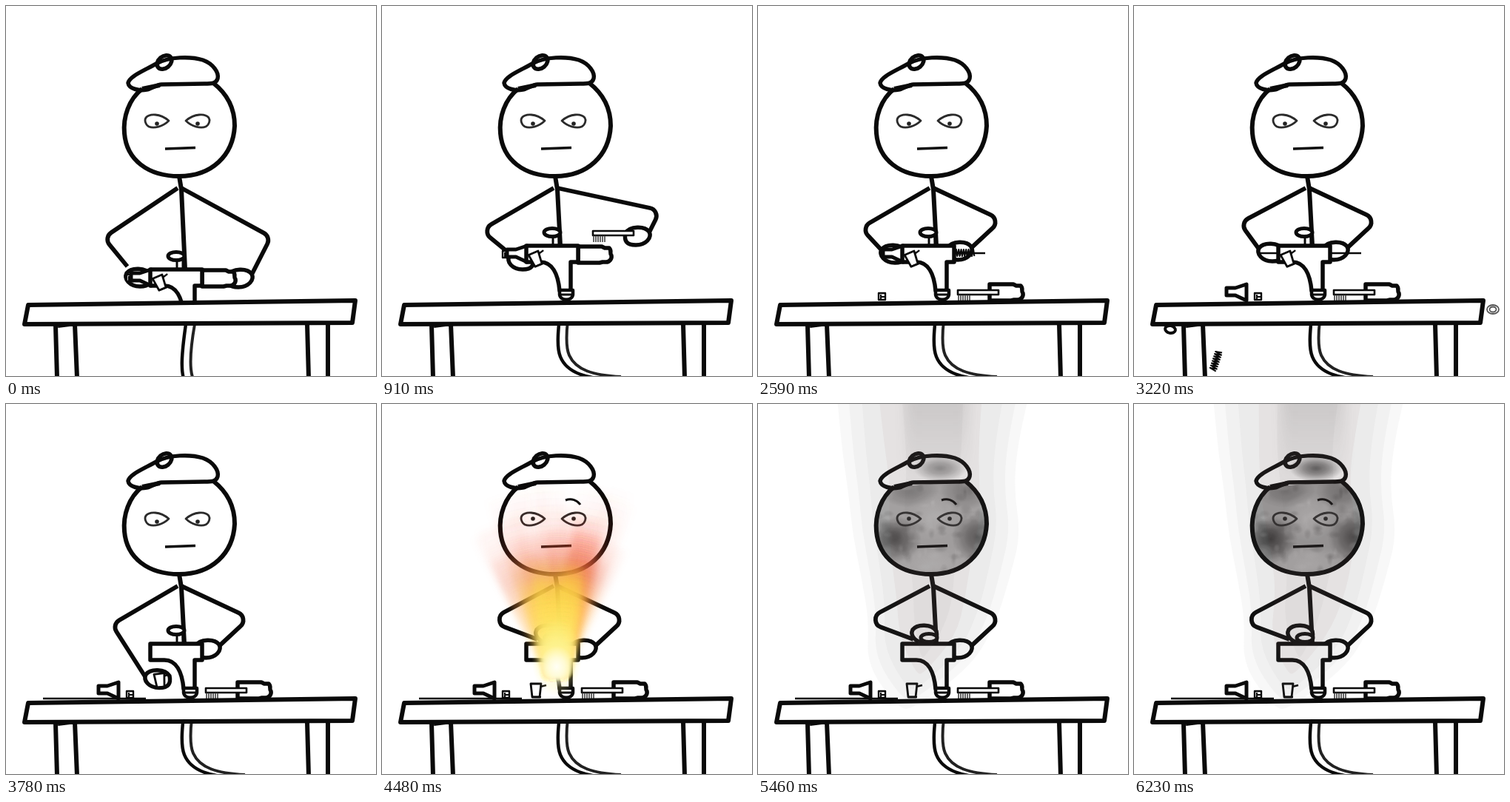
Write an HTML page with a canvas that moves like this. It is 500x500 px and loops after 6.3 s.

```html
<!DOCTYPE html>
<html>
<head>
<meta charset="utf-8">
<style>
html, body { margin: 0; width: 100%; height: 100%; overflow: hidden; background: #fff; }
canvas { display: block; }
</style>
</head>
<body>
<canvas id="stage" width="500" height="500"></canvas>
<script>
const c = document.getElementById('stage').getContext('2d');
const LOOP = 6300, STEP = 70, INK = '#0a0a0a', TAU = Math.PI * 2;
const clamp = v => Math.max(0, Math.min(1, v));
const mix = (a, b, k) => a + (b - a) * k;
const ramp = (t, from, to) => clamp((t - from) / (to - from));

// Rows are [time, ...values]; returns the values interpolated at t.
function at(rows, t) {
  const i = rows.findIndex(r => r[0] > t);
  if (i === 0) return rows[0].slice(1);
  if (i < 0) return rows[rows.length - 1].slice(1);
  const a = rows[i - 1], b = rows[i];
  const k = (t - a[0]) / (b[0] - a[0]);
  return a.slice(1).map((v, j) => mix(v, b[j + 1], k));
}

function random(seed) {
  return () => (seed = (seed * 16807) % 2147483647) / 2147483647;
}

function shape(d, width = 5.5, fill, color = INK) {
  const p = new Path2D(d);
  if (fill) { c.fillStyle = fill; c.fill(p); }
  c.lineWidth = width;
  c.strokeStyle = color;
  c.stroke(p);
}

function oval(x, y, rx, ry, turn, width, fill, color = INK) {
  c.beginPath();
  c.ellipse(x, y, rx, ry, turn, 0, TAU);
  if (fill) { c.fillStyle = fill; c.fill(); }
  if (width) { c.lineWidth = width; c.strokeStyle = color; c.stroke(); }
}

function moved(x, y, draw, turn = 0) {
  c.save();
  c.translate(x, y);
  c.rotate(turn);
  draw();
  c.restore();
}

function glow(x, y, rx, ry, rgb, alpha) {
  moved(x, y, () => {
    c.scale(rx, ry);
    const g = c.createRadialGradient(0, 0, 0, 0, 0, 1);
    g.addColorStop(0, `rgba(${rgb},${alpha})`);
    g.addColorStop(.45, `rgba(${rgb},${alpha * .65})`);
    g.addColorStop(1, `rgba(${rgb},0)`);
    c.fillStyle = g;
    c.fillRect(-1, -1, 2, 2);
  });
}

// Motion: elbow x, y, fist x, y (left adds the wrist height)
const LEFT = [
  [0, 132, 313, 179, 367, -15], [280, 134, 303, 188, 344, -9],
  [2100, 134, 303, 188, 344, -9], [2240, 139, 300, 183, 335, -4],
  [2590, 139, 300, 183, 335, -4], [2870, 124, 318, 139, 387, -6],
  [3080, 143, 293, 185, 333, -3], [3290, 143, 293, 185, 333, -3],
  [3500, 128, 288, 67, 345, -3], [3570, 124, 300, 67, 392, -3],
  [3710, 143, 293, 205, 340, 0], [3810, 143, 300, 205, 385, 0],
  [3920, 143, 293, 225, 311, 7]];
const RIGHT = [
  [0, 358, 312, 316, 368], [280, 354, 298, 316, 336],
  [490, 360, 310, 330, 420], [700, 376, 276, 345, 311],
  [1190, 376, 276, 345, 311], [1400, 356, 315, 330, 391],
  [1610, 342, 290, 315, 327], [1750, 344, 296, 330, 345],
  [1960, 364, 306, 363, 378], [2100, 329, 289, 272, 331]];
const GUN = [[0, 32], [280, 0]];
const CAP = [[1610, 0, 0], [1750, 15, 18], [1960, 48, 51]];
const FUNNEL = [[2590, 0, 0], [2870, -44, 52]];
const PLUG = [[2310, 0], [2450, 57]];
const NEEDLE = [[3290, 0, 0], [3500, -118, 10], [3570, -118, 64]];

const HEAD = 'M184 112C166 126 158 150 160 172C163 208 192 230 234 230C278 230 307 202 309 162C309 136 298 118 280 104';
const BERET = 'M190 113C180 115 166 112 165 104C167 95 185 88 203 78C220 68 250 68 266 73C280 78 288 90 286 98C284 105 278 105 268 105L210 106C204 106 196 112 190 113Z';

function eye(pupilY) {
  shape('M189 151C194 145 208 145 220 155C212 163 200 166 193 163C188 160 187 154 189 151Z', 2.8, null, '#2b2b2b');
  oval(204, pupilY, 2.8, 2.8, 0, 0, '#222');
}

function soot(k) {
  c.save();
  c.globalAlpha = k;
  c.save();
  c.clip(new Path2D(HEAD + 'Z'));
  c.fillStyle = 'rgba(70,70,70,.5)';
  c.fillRect(150, 95, 170, 140);
  glow(185, 183, 36, 32, '25,25,25', .75);
  glow(296, 180, 34, 36, '25,25,25', .65);
  glow(205, 118, 40, 22, '50,50,50', .4);
  glow(280, 118, 34, 26, '50,50,50', .4);
  glow(236, 152, 36, 34, '235,235,235', .35);
  glow(236, 216, 55, 26, '230,230,230', .35);
  const r = random(11);
  for (let i = 0; i < 70; i++) {
    glow(160 + r() * 150, 105 + r() * 125, 3 + r() * 9, 3 + r() * 7, r() < .5 ? '30,30,30' : '220,220,220', .16);
  }
  c.restore();
  c.clip(new Path2D(BERET));
  glow(246, 87, 36, 18, '30,30,30', .7 * k * k);
  c.restore();
}

function head(t) {
  const dirt = t < 4550 ? 0 : at([[4550, 0], [4760, .75], [6230, 1]], t)[0];
  if (dirt) soot(dirt);
  shape(HEAD, 6);
  shape(BERET, 5.5);
  shape('M184 112L208 107', 6);
  oval(214, 76, 11, 8, -.7, 5.5);
  const pupilY = t < 3990 ? 159 : t < 4060 ? 157 : 155;
  eye(pupilY);
  c.save();
  c.translate(463, 0);
  c.scale(-1, 1);
  eye(pupilY);
  c.restore();
  shape('M215 193L256 191.500', 3.4);
  if (t >= 4200) shape(t < 4270 ? 'M248 130C253 128 258 129 261 131' : 'M248 130C256 127 264 130 268 136', 3);
}

function arm(x, ex, ey, wx, wy) {
  c.beginPath();
  c.moveTo(x, 246);
  c.arcTo(ex, ey, wx, wy, 11);
  c.lineTo(wx, wy);
  c.lineWidth = 5.8;
  c.strokeStyle = INK;
  c.stroke();
}

function fist(x, y, flip) {
  moved(x, y, () => {
    c.scale(flip ? -1 : 1, 1);
    shape('M-16-4C-10-14 10-14 16-6C20 2 12 12-2 12C-15 12-18 6-16-4Z', 5.5, '#fff');
  });
}

function brush() {
  shape('M285 304H340V310H285Z', 2.6, '#fff');
  for (let x = 286; x < 304; x += 3) shape(`M${x} 310V319`, 1.5, null, '#333');
}

function spring() {
  let d = 'M-13 4';
  for (let i = 0; i < 8; i++) d += 'l2-9l1.300 9';
  shape(d, 2);
}

function gun(t) {
  shape('M195 324H265V346H255V385H240C238 362 230 346 214 346H195Z', 5.5, '#fff');
  shape('M240 384H258V390C257 399 241 399 240 390Z', 4.5, '#fff');
  shape('M240 390H258', 3);
  const press = ramp(t, 3850, 3920);
  if (press < 1) shape('M231 312V322M239 312V322', 3);
  oval(230 + press, 306 + press * 10, 11, 5.5, 0, 5, '#fff');
  const k = ramp(t, 3710, 3810);
  moved(208, 342 + 45 * k, () => {
    shape('M-7-9H7L5 9H-5Z', 2.8, '#fff');
    shape('M6-5L14-7M-5 9H7', 2.4);
  }, -.4 * (1 - k));
}

function parts(t, g, hand) {
  const [nx, ny] = at(NEEDLE, t), [fx, fy] = at(FUNNEL, t), [cx, cy] = at(CAP, t);
  moved(nx, ny + g, () => shape('M168 334H307', 2.6));
  if (t < 2660) moved(279, 334 + g, spring);
  moved(0, at(PLUG, t)[0] + g, () => {
    shape('M163 340V331H172V340Z', 2.4, '#fff');
    shape('M166 333V340M166 336H172', 2);
  });
  moved(fx, fy + g, () => shape('M196 324L181 329H169V339H181L196 346Z', 5, '#fff'));
  moved(cx, cy + g, () => shape('M265 325H297L301 327H307C311 331 307 334 310 337C311 342 307 346 303 346H298L294 347H265Z', 5.5, '#fff'));
  if (t >= 490) {
    const [bx, by] = t < 1400 ? [hand[0] - 345, hand[1] - 311] : [-15, 80];
    moved(bx, by, brush);
  }
  moved(0, g, () => gun(t));
}

function hose() {
  shape('M243 398C237 440 236 462 241 474C250 496 275 504 323 506', 4.5);
  shape('M255 398C249 432 247 458 253 472C262 492 285 499 323 501', 4, null, '#222');
}

function table() {
  shape('M67 432L69 502M93 430L96 502M70 432L94 429M407 430L409 502M435 430V502', 6);
  shape('M30 404L472 398L468 428L25 430Z', 6, '#fff');
}

// Small parts thrown clear of the gun: s is 1 after 560 ms.
function debris(t) {
  const s = (t - 2660) / 560;
  if (s < 0 || s > 2) return;
  const fly = (x0, y0, x1, y1, lift, draw, turn) =>
    moved(mix(x0, x1, s), y0 - lift * s + (y1 - y0 + lift) * s * s, draw, turn);
  fly(180, 335, 49, 437, 70, () => oval(0, 0, 7, 5, .2, 4));
  fly(278, 334, 111, 480, 60, spring, -1.25 - (1 - s) * 5);
  fly(285, 334, 485, 410, 80, () => {
    oval(0, 0, 8, 6, 0, 1.8, null, '#555');
    oval(0, 0, 4.5, 3.500, 0, 1.8, null, '#555');
  });
}

const PLUME = {
  left: [[128, 105], [150, 113], [145, 122], [125, 128], [135, 140], [142, 150], [145, 147], [200, 190]],
  right: [[318, 370], [345, 350], [363, 346], [360, 355], [348, 340], [335, 322], [322, 290], [270, 210]]
};

function smoke(t) {
  const k = ramp(t, 4760, 5040), show = ramp(t, 4480, 4720);
  if (!show) return;
  const bottom = mix(383, 412, k);
  c.save();
  c.globalAlpha = show;
  [1, .88, .74, .54, .32].forEach((size, n) => {
    const drift = i => n > 2 ? 4 * Math.sin(t / 260 + i * 1.4 + n) : 0;
    const side = list => list.map((p, i) => [
      235 + (mix(p[0], p[1], k) - 235) * size + drift(i),
      i ? i / 7 * bottom * mix(.75, 1, size) : -30]);
    const pts = [...side(PLUME.left), ...side(PLUME.right).reverse()];
    c.beginPath();
    c.moveTo(...pts[0]);
    for (let i = 1; i < pts.length - 1; i++) {
      const [x, y] = pts[i], [u, v] = pts[i + 1];
      c.quadraticCurveTo(x, y, (x + u) / 2, (y + v) / 2);
    }
    c.lineTo(...pts[pts.length - 1]);
    c.fillStyle = n === 3 ? 'rgba(120,70,65,.05)' : 'rgba(90,86,86,.045)';
    c.fill();
  });
  const top = c.createLinearGradient(0, 0, 0, 110);
  top.addColorStop(0, 'rgba(70,70,70,.12)');
  top.addColorStop(1, 'rgba(70,70,70,0)');
  c.fillStyle = top;
  c.filter = 'blur(8px)';
  c.fillRect(200, -20, 85, 130);
  c.restore();
}

function fan(r, count, spread, reach, alpha, colors) {
  const g = c.createRadialGradient(0, 0, 0, 0, 0, reach);
  colors.forEach(([stop, color]) => g.addColorStop(stop, color));
  c.fillStyle = g;
  c.globalAlpha = alpha;
  for (let i = 0; i < count; i++) {
    const a = (r() - .5) * 2 * spread, w = .04 + r() * .1, len = reach * (.6 + r() * .4);
    c.beginPath();
    c.moveTo(-14, 2);
    c.lineTo(Math.sin(a - w) * len, -Math.cos(a - w) * len);
    c.lineTo(Math.sin(a + w) * len, -Math.cos(a + w) * len);
    c.lineTo(14, 2);
    c.fill();
  }
}

function flame(t) {
  if (t < 4410 || t > 5100) return;
  const size = t < 4480 ? .45 : 1, r = random(t);
  moved(236, 365 - Math.max(0, t - 4480) * .92, () => {
    c.scale(size, size);
    c.filter = 'blur(4px)';
    fan(r, 34, .5, 270, .13, [
      [0, 'rgba(255,225,90,1)'], [.35, 'rgba(255,170,70,1)'],
      [.52, 'rgba(240,105,65,.8)'], [.72, 'rgba(250,90,60,.25)'], [1, 'rgba(255,90,60,0)']]);
    fan(r, 26, .32, 175, .2, [
      [0, 'rgba(255,250,190,1)'], [.3, 'rgba(255,236,110,1)'],
      [.65, 'rgba(255,218,75,.8)'], [1, 'rgba(255,190,60,0)']]);
    c.filter = 'none';
    c.globalAlpha = 1;
    glow(0, -22, 34, 52, '255,245,150', .8);
    glow(0, -10, 24, 28, '255,255,245', 1);
  });
}

function draw(t) {
  const [g] = at(GUN, t);
  const [lx, ly, lhx, lhy, wrist] = at(LEFT, t);
  let [rx, ry, rhx, rhy] = at(RIGHT, t);
  if (t >= 700 && t <= 1190) {
    const scrub = 22 * (1 - Math.cos((t - 910) / 280 * TAU));
    rhx -= scrub;
    rx -= scrub * .45;
  }
  c.fillStyle = '#fff';
  c.fillRect(0, 0, 500, 500);
  c.lineCap = 'butt';
  c.lineJoin = 'round';
  moved(0, g, hose);
  shape(`M234 230L237 248L${241 + g / 32} ${324 + g}`, 6);
  arm(232, lx, ly, lhx - 15, lhy + wrist);
  arm(237, rx, ry, rhx + 15, rhy - 3);
  fist(lhx, lhy, true);
  fist(rhx, rhy);
  parts(t, g, [rhx, rhy]);
  table();
  debris(t);
  head(t);
  smoke(t);
  flame(t);
}

function tick() {
  draw(Math.floor(performance.now() % LOOP / STEP) * STEP);
  requestAnimationFrame(tick);
}
tick();
</script>
</body>
</html>
```
